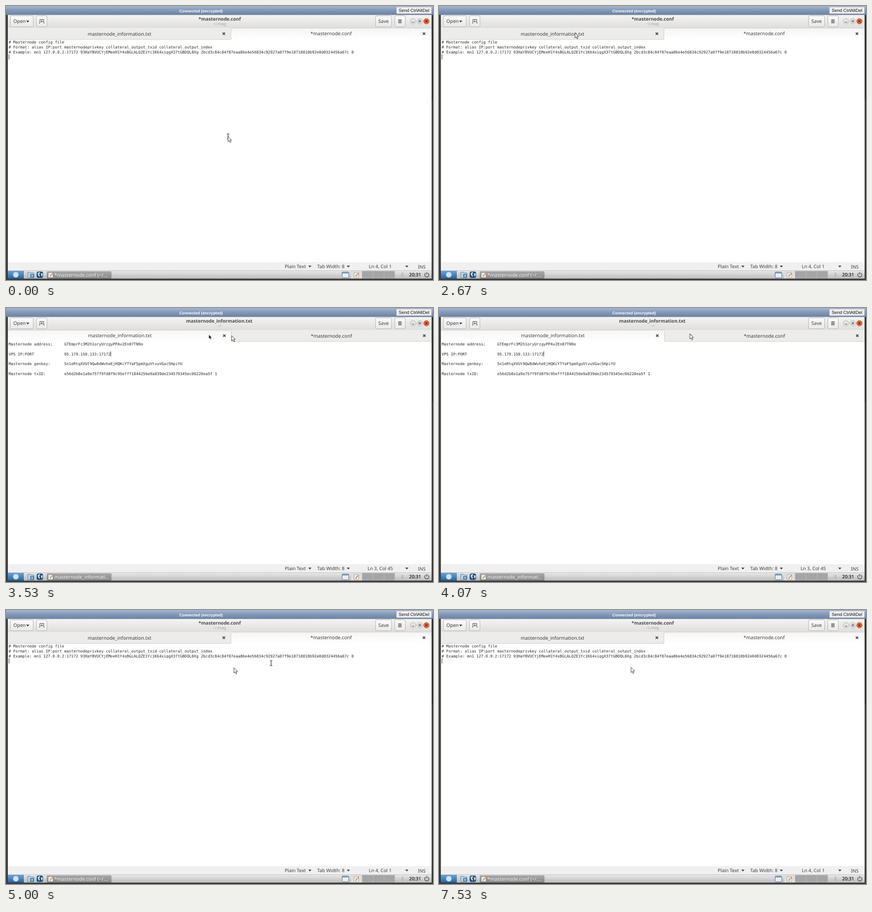
These frames come from a looping animation (933x600 px, 8000 ms). An HTML page:

```html
<!DOCTYPE html>
<html lang="en">
<head>
<meta charset="utf-8">
<title>Text editor</title>
<style>
  html, body { margin: 0; width: 100%; height: 100%; overflow: hidden; background: #3a3b3d; }
  svg { display: block; width: 933px; height: 600px; }
  text { font: 10.5px "Noto Sans", sans-serif; fill: #3c3c3c; text-rendering: geometricPrecision; white-space: pre; }
  .mid { text-anchor: middle; }
  .title { font-size: 10.2px; font-weight: 700; fill: #4a4a4a; }
  .path { font-size: 8.7px; fill: #a2a2a2; }
  .status { font-size: 10.3px; }
  .task { font-size: 10.6px; fill: #f2f2f2; }
  .clock { font-size: 10.3px; fill: #111; stroke: #111; stroke-width: .2px; }
  .arial { font: 9.8px "Liberation Sans", Arial, sans-serif; fill: #111; }
  .bar { font-size: 8.72px; font-weight: 700; fill: #fff; }
  .mono text { font: 8.413px "DejaVu Sans Mono", monospace; fill: #262626; }
  .btn { fill: url(#button); stroke: #b5b4b2; }
  .ink { fill: none; stroke: #3a3a3a; }
  .tri { fill: #3c3c3c; }
</style>
</head>
<body>
<svg viewBox="0 0 933 600">
  <defs>
    <linearGradient id="top" x2="0" y2="1"><stop stop-color="#a5b6cf"/><stop offset=".45" stop-color="#869ab8"/><stop offset="1" stop-color="#6b82a4"/></linearGradient>
    <linearGradient id="head" x2="0" y2="1"><stop stop-color="#f4f4f3"/><stop offset="1" stop-color="#dfdedd"/></linearGradient>
    <linearGradient id="button" x2="0" y2="1"><stop stop-color="#fbfbfb"/><stop offset="1" stop-color="#e9e9e8"/></linearGradient>
    <linearGradient id="tab" x2="0" y2="1"><stop stop-color="#f5f5f5"/><stop offset="1" stop-color="#fff"/></linearGradient>
    <linearGradient id="panel" x2="0" y2="1"><stop stop-color="#e9e9e9"/><stop offset="1" stop-color="#bcbcbc"/></linearGradient>
    <linearGradient id="task" x2="0" y2="1"><stop stop-color="#a9a9a9"/><stop offset="1" stop-color="#868686"/></linearGradient>
    <linearGradient id="menu" x2="0" y2="1"><stop stop-color="#6ea3d2"/><stop offset="1" stop-color="#28639f"/></linearGradient>
    <path id="close" d="M-2.6-2.6 2.6 2.6M2.6-2.6-2.6 2.6" fill="none" stroke="#333" stroke-width="1.6"/>
    <path id="drop" class="tri" d="M0 0h7l-3.5 4z"/>
    <g id="edit">
      <rect x=".5" y="1" width="10" height="10.5" fill="#fafafa" stroke="#8a8a8a" stroke-width=".8"/>
      <path d="M2.5 4h5M2.5 6h4M2.5 8h3" stroke="#aaa" stroke-width=".7"/>
      <path d="M4.5 9 10.5 2" stroke="#d9822b" stroke-width="1.8"/>
      <path d="M3.8 9.9 5 8.6" stroke="#333" stroke-width="1"/>
    </g>
  </defs>

  <rect width="933" height="600" fill="#3a3b3d"/>
  <rect x="930" y="19" width="3" height="186" fill="#2c2d2f"/>
  <rect width="933" height="19.5" fill="url(#top)"/>
  <text class="arial bar mid" x="426.3" y="13.6">Connected (encrypted)</text>
  <rect x="853.5" y="2.5" width="76" height="14" fill="#f0f0f0" stroke="#c9ced6"/>
  <text class="arial mid" x="891.5" y="13">Send CtrlAltDel</text>

  <rect x="4" y="19.5" width="926" height="29" fill="url(#head)"/>
  <rect class="btn" x="9.5" y="21.5" width="50" height="24" rx="2.5"/>
  <text x="16" y="37.3">Open</text>
  <use href="#drop" x="44" y="32"/>
  <rect class="btn" x="66.5" y="21.5" width="23" height="24" rx="2.5"/>
  <path class="ink" d="M72.3 37.5H74V29.5H82.4V37.5H84.2M78.2 31.2v5M75.7 33.7h5"/>
  <rect class="btn" x="807.5" y="21.5" width="35" height="24" rx="2.5"/>
  <text class="mid" x="825" y="37.3">Save</text>
  <rect class="btn" x="849.5" y="21.5" width="23" height="24" rx="2.5"/>
  <path class="ink" stroke-width="1.5" d="M857 30.4h7.4M857 33.5h7.4M857 36.6h7.4"/>
  <g fill="#e6e5e3" stroke="#aaa9a6" stroke-width=".9">
    <circle cx="889.3" cy="33.4" r="6"/>
    <circle cx="904.2" cy="33.4" r="6"/>
    <circle cx="918.6" cy="33.4" r="6" fill="#e8683f" stroke="#b34d2b"/>
  </g>
  <path class="ink" d="M886.8 35.5h5M902.4 31.8h3.6v3.2h-3.6z"/>
  <path d="M916.2 31l4.8 4.8M921 31l-4.8 4.8" stroke="#5a2413" stroke-width="1.4"/>

  <rect x="4" y="48" width="926" height="25.5" fill="#ececeb"/>
  <rect x="4" y="73" width="926" height="488.5" fill="#fff"/>
  <rect x="4" y="561" width="926" height="18.5" fill="#f0f0f0"/>
  <text class="status" x="609" y="574">Plain Text</text>
  <use href="#drop" x="660.5" y="568.5"/>
  <text class="status" x="680" y="574">Tab Width: 8</text>
  <use href="#drop" x="744.5" y="568.5"/>
  <use href="#drop" x="872.3" y="568.5"/>
  <text class="status" x="900" y="574.5">INS</text>

  <rect x="4" y="579.5" width="926" height="17.5" fill="url(#panel)"/>
  <rect x="4" y="580" width="35" height="17" fill="url(#menu)"/>
  <circle cx="21.5" cy="588.5" r="6" fill="#cfe2f2"/>
  <path d="M43.5 582v13" stroke="#c2c2c2"/>
  <path d="M47.5 583h6l1 1.5h6.5V595H47.5z" fill="#b8d3e8" stroke="#5d7f9c"/>
  <path d="M53 587h8v8h-8z" fill="#4a7fae"/><path d="m56 588.5 3 2.5-3 2.5z" fill="#fff"/>
  <rect x="67" y="581.5" width="14" height="14" rx="4" fill="#1d4a78"/>
  <path d="M69 585l4-2.5 2 2-3 3 2 2-1 4-3-4zM76 586l4-1v5l-2 3-1-3z" fill="#c9dfee"/>
  <rect x="89" y="581" width="141.5" height="16" rx="2" fill="url(#task)"/>
  <use href="#edit" x="92" y="583"/>

  <rect x="734.5" y="582.5" width="14.5" height="12.5" rx="1.5" fill="#e9eef3" stroke="#536b83"/>
  <path d="M735 584.5h13.5" stroke="#5c8ab5" stroke-width="2"/>
  <rect x="754" y="580.5" width="24" height="16" fill="#dedede"/>
  <use href="#edit" x="760" y="583"/>
  <rect x="778" y="580.5" width="71.5" height="16" fill="#a5a5a5"/>
  <path d="M802.2 580.5v16M826 580.5v16" stroke="#bdbdbd"/>
  <path d="m863.5 586 5 5-2.5 2.5v-10l2.5 2.5-5 5" fill="none" stroke="#adadad"/>
  <text class="clock" x="880.8" y="592.3">20:31</text>
  <path d="M917.2 584.7a4.6 4.6 0 1 0 4.4 0M919.4 582.6v5.5" class="ink" stroke-width="1.2"/>

  <g id="conf">
    <path d="M491.5 73.5V51q0-2.5 2.5-2.5h436v25z" fill="url(#tab)"/>
    <path d="M4 73.3h487.5V51q0-2.5 2.5-2.5h436" fill="none" stroke="#d0cfce"/>
    <text class="title mid" x="467" y="31.7">*masternode.conf</text>
    <text class="path mid" x="466.5" y="42.3">~/.mag</text>
    <text class="mid" x="248" y="64.6">masternode_information.txt</text>
    <text class="mid" x="710.3" y="64">*masternode.conf</text>
    <use href="#close" x="476" y="60.7"/><use href="#close" x="913.3" y="60.7"/>
    <g class="mono" id="confDoc"></g>
    <text class="status mid" id="line4" x="817.7" y="574">Ln 4, Col 1</text>
    <text class="status mid" id="line5" x="817.7" y="574">Ln 5, Col 1</text>
    <text class="task" x="105.8" y="592.5">*masternode.conf (~/....</text>
  </g>
  <g id="info">
    <path d="M4 73.5v-25H490q2.5 0 2.5 2.5v22.5z" fill="url(#tab)"/>
    <path d="M4 48.5H490q2.5 0 2.5 2.5v22.3h437.5" fill="none" stroke="#d0cfce"/>
    <text class="title mid" x="466" y="31.7">masternode_information.txt</text>
    <text class="path mid" x="466" y="42.3">~/</text>
    <text class="mid" x="248.8" y="64">masternode_information.txt</text>
    <text class="mid" x="711" y="64.6">*masternode.conf</text>
    <use href="#close" x="477" y="60.7"/><use href="#close" x="914" y="60.7"/>
    <g class="mono" id="infoDoc"></g>
    <text class="status mid" x="817.7" y="574">Ln 3, Col 45</text>
    <text class="task" x="105.8" y="592.5">masternode_informati...</text>
  </g>
  <rect id="caret" width="1" height="11" fill="#222"/>
  <g id="remote">
    <path id="beam" d="M-2.8-5.2H-.8L0-4.6.8-5.2H2.8M0-4.6V4.6M-2.8 5.2H-.8L0 4.6.8 5.2H2.8" fill="none" stroke="#111" stroke-width="1.1"/>
    <path id="black" d="M0 0V9.2L2.1 7.3 3.6 10.6 5.1 9.9 3.7 6.7H6.3z" fill="#000" stroke="#fff" stroke-width=".5"/>
  </g>
  <path id="local" d="M0 .5V11.9L2.6 9.5 4.5 13.9 6.5 13 4.6 8.8H8.1z" fill="#fff" stroke="#222" stroke-width=".9"/>
</svg>

<script>
const LOOP = 8000, TICK = 1000 / 15, TICKS = 120;
const $ = id => document.getElementById(id);

// Document text
const LEFT = 6, CHAR = 5.065, TOP = 73.5, ROW = 10.83;
function write(doc, row, col, str) {
  const el = document.createElementNS('http://www.w3.org/2000/svg', 'text');
  el.setAttribute('x', LEFT + col * CHAR - .3);
  el.setAttribute('y', TOP + row * ROW + 8.5);
  el.textContent = str;
  $(doc).append(el);
}
[
  '# Masternode config file',
  '# Format: alias IP:port masternodeprivkey collateral_output_txid collateral_output_index',
  '# Example: mn1 127.0.0.2:17172 93HaYBVUCYjEMeeH1Y4sBGLALQZE1Yc1K64xiqgX37tGBDQL8Xg 2bcd3c84c84f87eaa86e4e56834c92927a07f9e18718810b92e0d0324456a67c 0'
].forEach((str, i) => write('confDoc', i, 0, str));
[
  ['Masternode address;', 'GTEmprFc3M2h1oryUrzgyPPAv2En87TN9o'],
  ['VPS IP:PORT', '95.179.150.133:17172'],
  ['Masternode genkey:', '5n1eRtqXVUt9Qw8dWvheEjHQKcYTYaF5pmXguVtvuVGacSHpiYU'],
  ['Masternode txID:', 'e56d2b8e1a9e757f9fd8f9c95efff1844256e9a839de234579345ec06220ea5f 1']
].forEach(([label, value], i) => {
  write('infoDoc', i * 2, 0, label);
  write('infoDoc', i * 2, 24, value);
});

// Pointer path: tick, x, y
const route = [
  [0, 485, 285], [26, 485, 285], [27, 469, 262], [28, 445, 232], [30, 392, 172],
  [33, 330, 100], [35, 308, 73], [37, 299, 61], [39, 297, 58],
  [48, 297, 58], [49, 304, 58], [50, 331, 58], [52, 443, 58], [53, 493, 60],
  [55, 535, 52], [56, 543, 52], [58, 548, 56],
  [66, 548, 56], [67, 556, 60], [69, 612, 83], [71, 642, 104], [72, 636, 111],
  [73, 616, 115], [74, 579, 116], [75, 498, 126], [76, 462, 128], [77, 452, 128],
  [91, 452, 128], [94, 436, 128], [97, 419, 124], [102, 419, 124], [103, 419.5, 125], [120, 419.5, 125]
];
function at(tick) {
  const i = Math.max(1, route.findIndex(p => p[0] >= tick));
  const [t0, x0, y0] = route[i - 1], [t1, x1, y1] = route[i];
  const k = Math.max(0, (tick - t0) / (t1 - t0));
  return [x0 + (x1 - x0) * k, y0 + (y1 - y0) * k];
}

// Hold a value for every tick; equal neighbours are merged
function play(id, prop, value) {
  const frames = [];
  let last;
  for (let n = 0; n < TICKS; n++) {
    const v = value(n);
    if (v === last) continue;
    frames.push({ offset: Math.max(0, n * TICK - 4) / LOOP, [prop]: v, easing: 'steps(1, end)' });
    last = v;
  }
  frames.push({ offset: 1, [prop]: last });
  $(id).animate(frames, { duration: LOOP, iterations: Infinity });
}
const show = (id, test) => play(id, 'opacity', n => test(n) ? 1 : 0);
const move = (id, point) => play(id, 'transform', n => {
  const [x, y] = point(n);
  return `translate(${x.toFixed(1)}px, ${y.toFixed(1)}px)`;
});

const within = (n, spans) => spans.some(([a, b]) => n >= a && n < b);
const onInfo = n => within(n, [[43, 62]]);
const onLine5 = n => within(n, [[80, 113]]);
const lagged = n => at(Math.max(0, n - 1));
const overText = n => lagged(n)[1] > 73;
const typing = n => within(n, [[80, 93], [113, 120]]);

show('info', onInfo);
show('conf', n => !onInfo(n));
show('line4', n => !onLine5(n));
show('line5', onLine5);
show('caret', n => !within(n, [[5, 12], [55, 61], [68, 74], [86, 92], [104, 111]]));
move('caret', n => onInfo(n) ? [228.4, 95] : [6, onLine5(n) ? 117 : 106]);
move('local', at);
move('remote', n => lagged(n).map(v => v + .3));
show('beam', n => overText(n) && !typing(n));
show('black', n => !overText(n));
</script>
</body>
</html>
```
